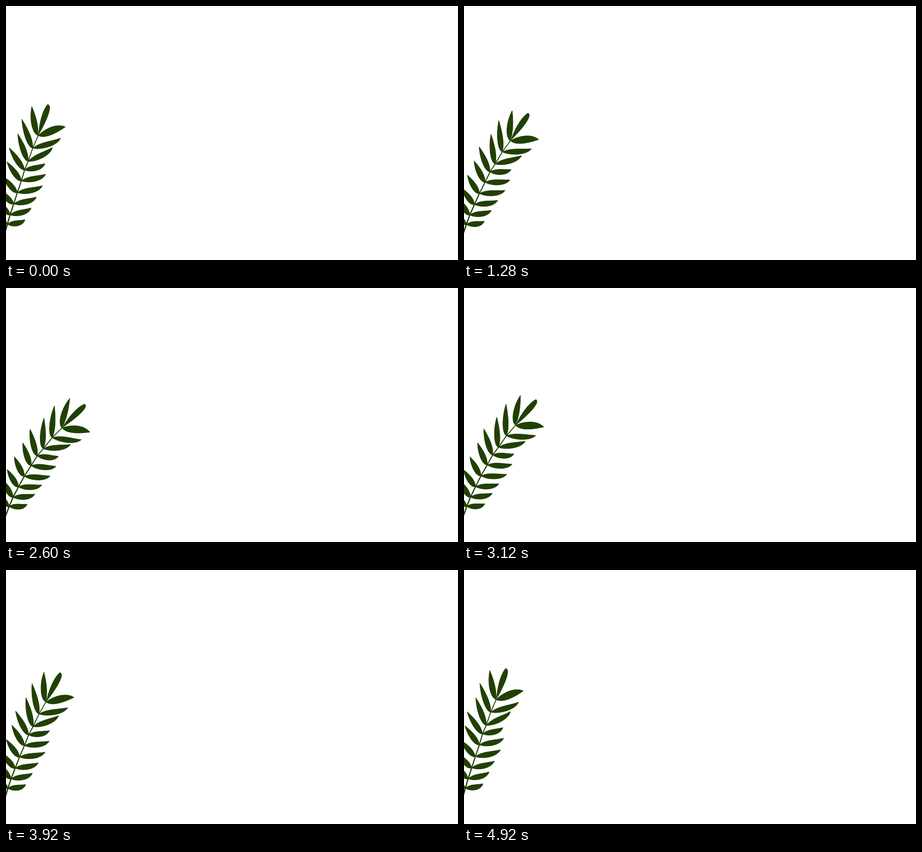
An HTML page with a canvas for the animation above (4960 ms loop, 998 px wide and 561 px high).

```html
<!DOCTYPE html>
<html lang="en">
<head>
<meta charset="utf-8">
<title>Swaying branch</title>
<style>
  html, body { margin: 0; width: 100%; height: 100%; overflow: hidden; background: #fff; }
  canvas { display: block; }
</style>
</head>
<body>
<canvas id="stage" width="998" height="561"></canvas>
<script>
const ctx = document.getElementById('stage').getContext('2d');
const LOOP = 4960, STEP = 40, PEAK = 2400;
const MAX_BEND = 0.00151, STRETCH = 0.0145;

// Root of the branch, direction of its stem, and the normal to the right.
const root = [-21.2, 550.9], axis = [0.3277, -0.9447], side = [0.9447, 0.3277];

// Joint, tip of the right leaf, tip of the left leaf; from the top down.
const pairs = [
  [71, 286, 131, 267, 57, 222],
  [59, 314, 120.5, 292, 35, 250],
  [49, 343, 102.5, 312.5, 26, 282],
  [41, 362, 86, 348, 7, 313],
  [34, 386, 87.5, 371.5, 2, 344],
  [25, 412, 80.5, 397, -7, 376],
  [17, 437, 67, 422, -15, 405],
  [9, 461, 55.5, 446, -22, 426],
  [3, 482, 42, 472, -30, 453]
];

// Control points of both edges: [fraction of length, offset] twice per edge.
const shapes = {
  right: [[0.3, -7], [0.6, -1], [0.22, 10], [0.8, 14]],
  left: [[0.25, -8], [0.65, -5], [0.06, 10], [0.6, 9]],
  topRight: [[0.3, -10], [0.75, -14], [0.15, 11], [0.55, 9]],
  topLeft: [[0.3, -5], [0.6, -5], [0.08, 12], [0.6, 12]],
  middle: [[0.35, -6], [0.8, -7], [0.4, 7], [1.03, 13]]
};

function leaf(bx, by, tx, ty, shape, dir) {
  const dx = tx - bx, dy = ty - by, len = Math.hypot(dx, dy);
  const at = ([f, o]) => [bx + dx * f - dy / len * o * dir, by + dy * f + dx / len * o * dir];
  const [a, b, c, d] = shape.map(at);
  return [[bx, by], a, b, [tx, ty], d, c];
}

const leaves = [leaf(72, 284, 92, 217.5, shapes.middle, 1)];
pairs.forEach(([x, y, rx, ry, lx, ly], i) => {
  leaves.push(leaf(x, y, rx, ry, i ? shapes.right : shapes.topRight, 1));
  leaves.push(leaf(x, y, lx, ly, i ? shapes.left : shapes.topLeft, -1));
});
const stem = [...pairs.map(([x, y]) => [x, y]), [-4, 507]];

// Cubic easing with handles (a, 0) and (b, 1).
function ease(x, a, b) {
  let lo = 0, hi = 1;
  for (let i = 0; i < 24; i++) {
    const p = (lo + hi) / 2, q = 1 - p;
    if (3 * q * q * p * a + 3 * q * p * p * b + p * p * p < x) lo = p; else hi = p;
  }
  return lo * lo * (3 - 2 * lo);
}

function sway(t) {
  return t < PEAK
    ? ease(t / PEAK, 0.33, 0.64)
    : 1 - ease((t - PEAK) / (LOOP - PEAK), 0.33, 0.58);
}

// Wraps the straight stem axis onto a circular arc.
function bender(u) {
  const k = Math.max(MAX_BEND * u, 1e-7), r = 1 / k;
  return ([x, y]) => {
    const px = x - root[0], py = y - root[1];
    const s = px * axis[0] + py * axis[1], d = px * side[0] + py * side[1];
    const along = (r - d) * Math.sin(k * s) * (1 + STRETCH * u);
    const out = r - (r - d) * Math.cos(k * s);
    return [
      root[0] + along * axis[0] + out * side[0],
      root[1] + along * axis[1] + out * side[1]
    ];
  };
}

function draw(t) {
  const bend = bender(sway(t));
  ctx.fillStyle = '#fff';
  ctx.fillRect(0, 0, 998, 561);
  ctx.fillStyle = ctx.strokeStyle = '#214003';
  ctx.lineCap = ctx.lineJoin = 'round';

  const line = stem.map(bend);
  for (let i = 1; i < line.length; i++) {
    ctx.lineWidth = 1.8 + i * 0.12;
    ctx.beginPath();
    ctx.moveTo(...line[i - 1]);
    ctx.lineTo(...line[i]);
    ctx.stroke();
  }

  ctx.lineWidth = 1;
  for (const points of leaves) {
    const [base, a, b, tip, c, d] = points.map(bend);
    ctx.beginPath();
    ctx.moveTo(...base);
    ctx.bezierCurveTo(...a, ...b, ...tip);
    ctx.bezierCurveTo(...c, ...d, ...base);
    ctx.closePath();
    ctx.fill();
    ctx.stroke();
  }
}

function tick() {
  const t = performance.now() % LOOP;
  draw(Math.floor(t / STEP) * STEP);
  requestAnimationFrame(tick);
}
tick();
</script>
</body>
</html>
```
